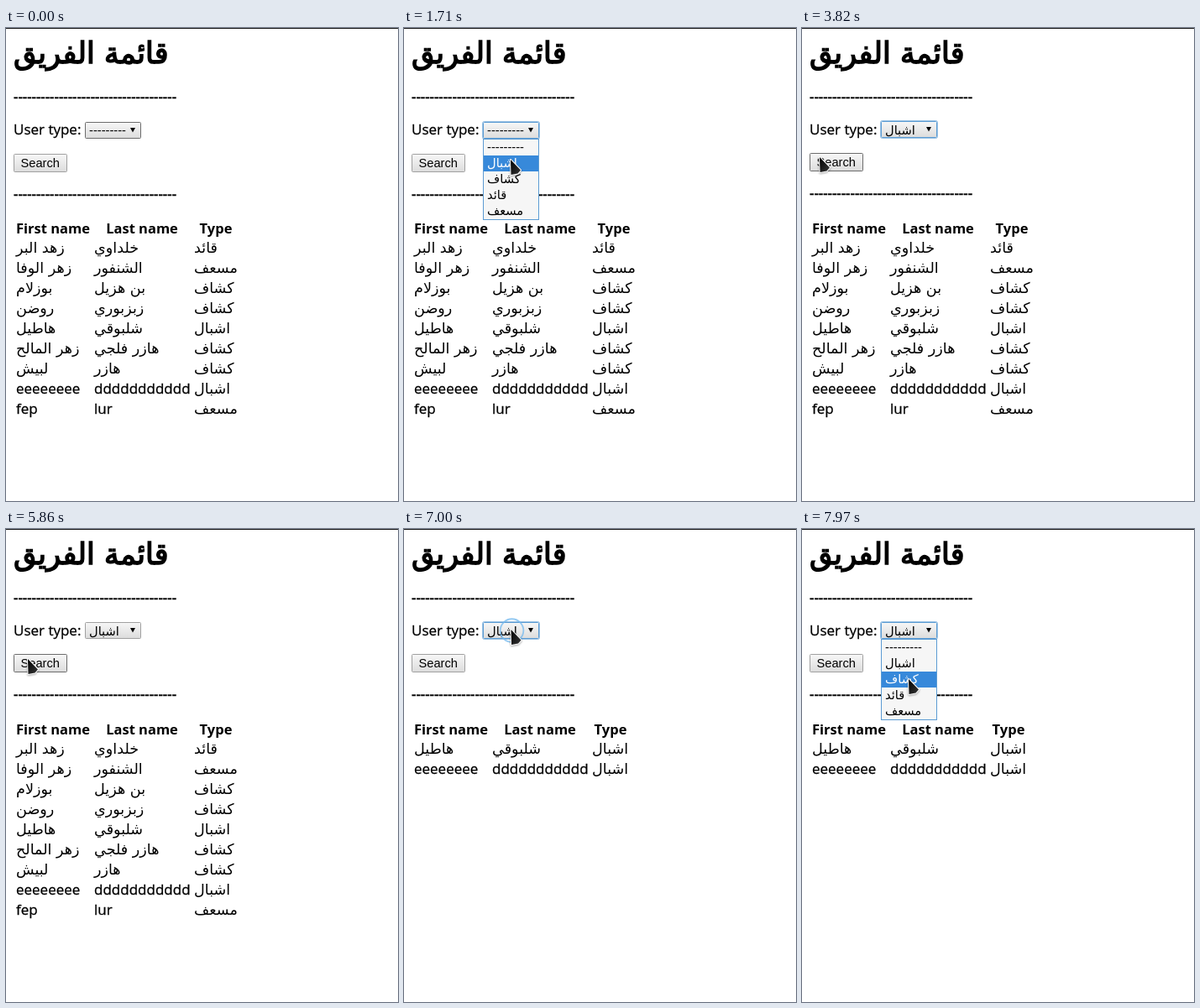
An HTML page for the animation above (8000 ms loop, 467 by 564 pixels).

```html
<!DOCTYPE html>
<html lang="en">
<head>
<meta charset="utf-8">
<title>Team list</title>
<style>
  html, body { margin: 0; width: 100%; height: 100%; overflow: hidden; background: #fff; }
  svg { display: block; width: 467px; height: 564px; }
  text { font: 17px "Open Sans", "DejaVu Sans", sans-serif; white-space: pre; stroke: #000; stroke-width: .3px; }
  .arabic { font: 17.6px "DejaVu Sans", sans-serif; stroke: none; }
  .title { font-size: 35.2px; stroke: #000; stroke-width: 1.5px; }
  .rule { font-weight: 600; font-size: 16.75px; }
  .head { font-weight: bold; font-size: 16.5px; text-anchor: middle; stroke: none; }
  .control { font: 14.67px "Liberation Sans", "DejaVu Sans", sans-serif; stroke: none; }
  .control.arabic { font-family: "DejaVu Sans", sans-serif; }
  #pointer { filter: drop-shadow(0 1px 1px rgba(0, 0, 0, .35)); }
</style>
</head>
<body>
<svg id="stage" viewBox="0 0 467 564">
  <defs>
    <linearGradient id="face" x2="0" y2="1">
      <stop stop-color="#f7f7f7"/><stop offset="1" stop-color="#dcdcdc"/>
    </linearGradient>
    <linearGradient id="ink" x2="1" y2="1">
      <stop stop-color="#000"/><stop offset="1" stop-color="#383838"/>
    </linearGradient>
  </defs>
</svg>
<script>
const LOOP = 8000;
const BLUE = '#5b9bd3', GRAY = '#a0a0a0', DARK = '#6c6c6c';
const CHOICES = ['---------', 'اشبال', 'كشاف', 'قائد', 'مسعف'];
const MEMBERS = [
  ['زهد البر', 'خلداوي', 3],
  ['زهر الوفا', 'الشنفور', 4],
  ['بوزلام', 'بن هزيل', 2],
  ['روضن', 'زبزبوري', 2],
  ['هاطيل', 'شلبوقي', 1],
  ['زهر المالح', 'هازر فلجي', 2],
  ['لبيش', 'هازر', 2],
  ['eeeeeeee', 'ddddddddddd', 1],
  ['fep', 'lur', 4]
];
const COLUMNS = [12, 105, 224];

// Pointer positions: time, x, y
const PATH = [
  [450, 124, 122], [700, 126, 124], [1450, 126, 124], [1710, 127, 157],
  [3149, 127, 157], [3150, 126, 158], [3400, 126, 158], [3820, 21, 154],
  [5329, 21, 154], [5330, 20, 153], [5859, 20, 153], [5860, 26, 155],
  [5960, 26, 155], [6390, 107.5, 133], [6580, 127, 119], [6750, 127, 119],
  [7220, 128, 121], [7690, 128, 121], [7970, 127, 179]
];
// Click rings: time, duration, final radius
const RINGS = [[450, 350, 20], [1180, 260, 13], [4050, 350, 13], [6750, 450, 20], [7400, 290, 13]];

const stage = document.getElementById('stage');
const isArabic = s => /[\u0600-\u06ff]/.test(s);
const within = (t, from, to) => t >= from && t < to;
const show = (el, on) => el.setAttribute('visibility', on ? 'visible' : 'hidden');
const shift = (el, x, y) => el.setAttribute('transform', `translate(${x} ${y})`);

function add(parent, tag, attrs = {}) {
  const el = document.createElementNS('http://www.w3.org/2000/svg', tag);
  for (const key in attrs) el.setAttribute(key, attrs[key]);
  return parent.appendChild(el);
}
function write(parent, x, y, label, kind = '') {
  const el = add(parent, 'text', { x, y, class: kind + (isArabic(label) ? ' arabic' : '') });
  el.textContent = label;
  return el;
}
function box(parent, x, y, width, height, extra) {
  return add(parent, 'rect', { x, y, width, height, ...extra });
}
function buildTable(members) {
  const table = add(stage, 'g');
  members.forEach(([first, last, type], row) =>
    [first, last, CHOICES[type]].forEach((label, col) =>
      write(table, COLUMNS[col], 268 + 24 * row, label)));
  return table;
}

box(stage, 0, 0, 467, 1, { fill: '#1c1c1c' });
write(stage, 9, 42, 'قائمة الفريق', 'title');
write(stage, 9, 88, '-'.repeat(36), 'rule');
write(stage, 9, 127, 'User type:');
write(stage, 56, 245, 'First name', 'head');
write(stage, 162, 245, 'Last name', 'head');
const typeHead = write(stage, 250, 245, 'Type', 'head');
const fullTable = buildTable(MEMBERS);
const cubTable = buildTable(MEMBERS.filter(m => m[2] === 1));

const form = add(stage, 'g');
write(form, 9, 203, '-'.repeat(36), 'rule');
const button = box(form, 9.5, 149.5, 63, 21, { fill: 'url(#face)', rx: 1 });
write(form, 17.5, 165, 'Search', 'control');
const select = box(form, 94.5, 111.5, 66, 19, { fill: 'url(#face)', rx: 1 });
const selectGlow = box(form, 93.5, 110.5, 68, 21, { fill: 'none', stroke: BLUE, 'stroke-opacity': .6, rx: 2 });
const buttonGlow = box(form, 8.5, 148.5, 65, 23, { fill: 'none', stroke: BLUE, 'stroke-opacity': .6, rx: 2 });
add(form, 'path', { d: 'M148 118h6l-3 5.5z' });
const values = [0, 1].map(i => write(stage, 99, 127, CHOICES[i], 'control'));

const popup = add(form, 'g');
box(popup, 94.5, 131.5, 66, 96, { fill: '#f6f6f6', stroke: BLUE });
const highlight = box(popup, 95, 132, 65, 19, { fill: '#3789da' });
const options = CHOICES.map((label, i) => write(popup, 99, 146 + 19 * i, label, 'control'));

const ring = add(stage, 'circle', { fill: 'none', stroke: '#74b9ee', 'stroke-width': 1.8 });
const pointer = add(stage, 'path', {
  id: 'pointer', d: 'M0 0L12 12.5L8.5 16.5L.5 18Z', fill: 'url(#ink)', stroke: '#fff',
  'stroke-width': 2, 'stroke-linejoin': 'round', 'paint-order': 'stroke'
});

function pointerAt(t) {
  const next = PATH.findIndex(p => p[0] > t);
  if (next < 1) return PATH[next < 0 ? PATH.length - 1 : 0].slice(1);
  const [t0, x0, y0] = PATH[next - 1], [t1, x1, y1] = PATH[next];
  const k = (t - t0) / (t1 - t0);
  return [x0 + (x1 - x0) * k, y0 + (y1 - y0) * k];
}

function border(el, focused, x, y) {
  const { x: left, y: top, width, height } = el.getBBox();
  const hovered = within(x, left, left + width) && within(y, top, top + height);
  el.setAttribute('stroke', focused ? BLUE : hovered ? DARK : GRAY);
}

function draw(t) {
  const [x, y] = pointerAt(t);
  const chosen = t >= 3320 ? 1 : 0;
  const drop = 1 - chosen;
  const filtered = t >= 6000;
  const open = within(t, 1180, 3320) || t >= 7400;
  const selectFocus = within(t, 500, 4050) || t >= 6800;
  const buttonFocus = within(t, 4050, 4400);

  shift(form, 0, drop);
  show(fullTable, !filtered);
  show(cubTable, filtered);
  typeHead.setAttribute('x', filtered ? 246 : 250);
  values.forEach((el, i) => show(el, i === chosen));
  border(select, selectFocus, x, y - drop);
  border(button, buttonFocus, x, y - drop);
  show(selectGlow, selectFocus);
  show(buttonGlow, buttonFocus);

  popup.setAttribute('display', open ? 'inline' : 'none');
  const hovered = Math.floor((y - 132 - drop) / 19);
  const active = hovered < 0 ? chosen : hovered;
  shift(highlight, 0, 19 * active);
  options.forEach((el, i) => el.setAttribute('fill', i === active ? '#fff' : '#000'));

  const click = RINGS.find(([from, span]) => within(t, from, from + span));
  show(ring, click);
  if (click) {
    const p = (t - click[0]) / click[1];
    ring.setAttribute('r', click[2] * (.3 + .7 * p));
    ring.setAttribute('opacity', .95 - .35 * p);
    shift(ring, x + 1, y + 1);
  }
  show(pointer, t >= 450);
  shift(pointer, x, y);
}

const begin = performance.now();
function tick() {
  draw((performance.now() - begin) % LOOP);
  requestAnimationFrame(tick);
}
tick();
</script>
</body>
</html>
```
